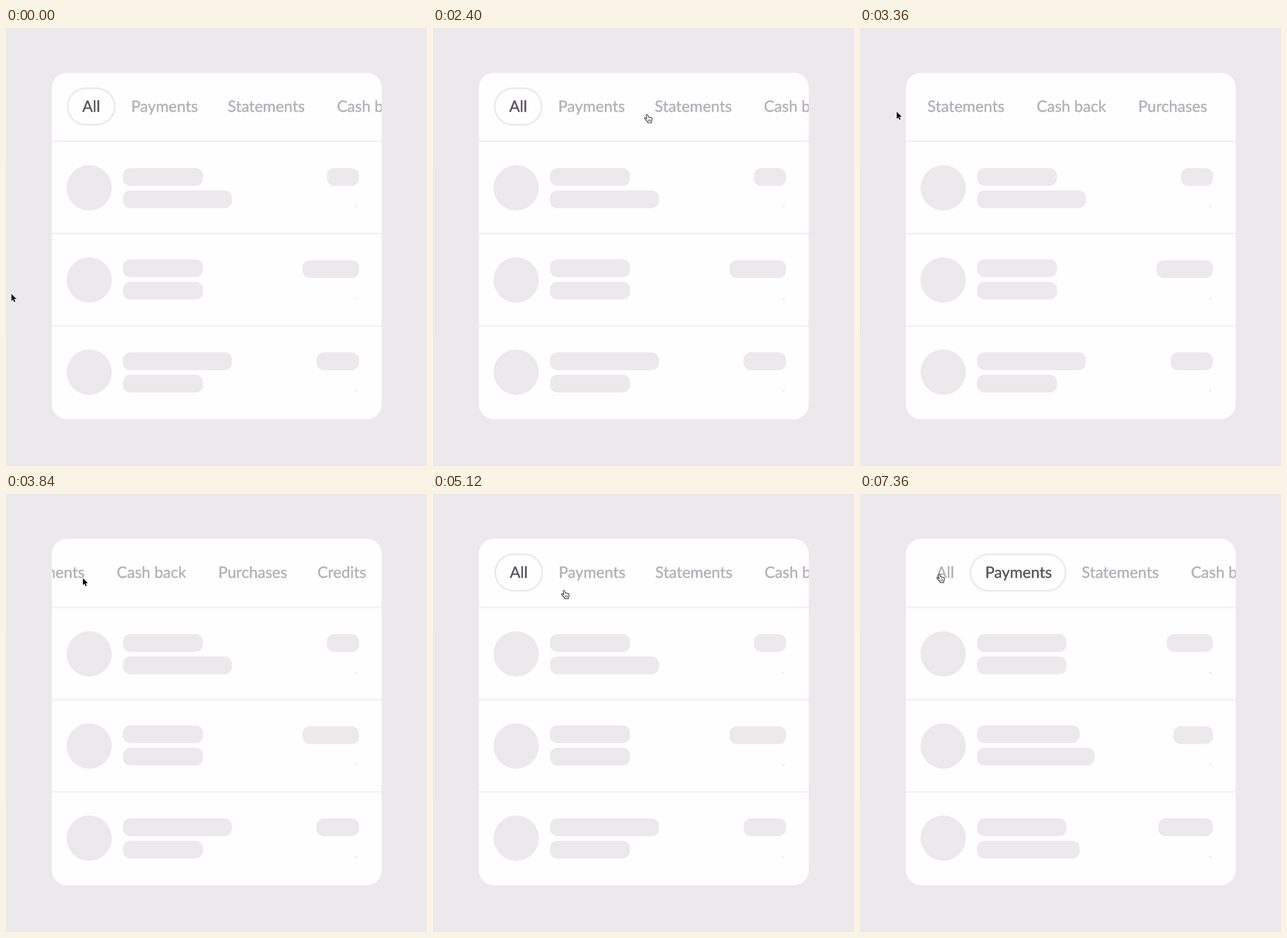
Animation of 734x763 px, one loop 8000 ms. Source, as an HTML page:

```html
<!DOCTYPE html>
<html lang="en">
<head>
<meta charset="utf-8">
<title>Filter tabs</title>
<style>
  html, body { margin: 0; width: 100%; height: 100%; overflow: hidden; background: #ebe9ec; }
  svg { display: block; width: 734px; height: 763px; }
  text { font: 400 27.2px Lato, sans-serif; text-anchor: middle; stroke-width: .5;
         text-rendering: geometricPrecision; }
  .pill { fill: none; stroke: #ebe9ec; stroke-width: 3; }
  .rule { stroke: #f3f1f4; stroke-width: 3; }
  .bone { fill: #ebe9ec; }
  .speck { stroke: #c4c2c7; stroke-width: 1; }
</style>
</head>
<body>
<svg viewBox="0 0 734 763">
  <clipPath id="clip"><rect x="80" y="78" width="575" height="603.5" rx="26"/></clipPath>
  <path d="M.5 240V536" stroke="#e6e4e8"/>
  <rect x="80" y="78" width="575" height="603.5" rx="26" fill="#fefdff"/>
  <g clip-path="url(#clip)">
    <g id="tabs"></g>
    <path class="rule" d="M80 197.5H655M80 358.2H655M80 519H655"/>
  </g>
  <g id="rows"></g>
  <path id="arrow" d="M0 0V12.2L2.8 9.6L4.7 14L6.7 13.1L4.8 8.8L8.7 8.6Z" fill="#0b0a0c"
        stroke="#fff" stroke-width="1" stroke-opacity=".7" paint-order="stroke"/>
  <g id="hand" stroke="#29282c" stroke-width="1.1" stroke-linejoin="round" stroke-linecap="round">
    <path fill="#fff" d="M5 9L4 2.5Q4 .8 5.3 .8Q6.4 .8 6.8 2.4L7.6 5.5Q9.5 4.8 10 6Q11.8 5.4 12.3 6.7Q14.2 6.4 14.3 8.5Q14.6 11 13 13.5V15.5H7Q6.5 13.5 4.8 12L1.4 8.6Q.6 7 2 6.6Q3.2 6.4 4.8 8.4Z"/>
    <path fill="none" stroke-width=".8" d="M7.8 10V13M9.7 10V13M11.6 10V13"/>
  </g>
</svg>
<script>
const LOOP = 8000, STEP = 160;
const LEFT = 204, RIGHT = 615.5, ROW_TOP = 278.5, ROW_GAP = 160.5;
const $ = id => document.getElementById(id);
const mix = (a, b, p) => a + (b - a) * p;

// Eased progress of t from start to end, held at 0 and 1 outside
function ease(t, start, end) {
  const p = Math.min(1, Math.max(0, (t - start) / (end - start)));
  return p * p * (3 - 2 * p);
}

function add(parent, tag, attrs, text) {
  const el = document.createElementNS('http://www.w3.org/2000/svg', tag);
  for (const k in attrs) el.setAttribute(k, attrs[k]);
  if (text) el.textContent = text;
  parent.appendChild(el);
  return el;
}

// Tabs: label and centre
const labels = Object.entries({ All: 148.5, Payments: 276.3, Statements: 453.8,
  'Cash back': 637.5, Purchases: 814, Credits: 969.5 })
  .map(([s, x]) => add($('tabs'), 'text', { x, y: 145.8, fill: '#b3b1b6', stroke: '#b3b1b6' }, s));
const pill = (x, width) => add($('tabs'), 'rect',
  { class: 'pill', x, y: 105, width, height: 63.5, rx: 31.75 });
const pills = [pill(107.5, 82), pill(192.5, 166)];

// Rows: widths before and after the filter changes
const rows = [
  { title: [139.5, 156], note: [190, 156], amount: [56, 80.5], ring: '#bfe6e2', lift: 0 },
  { title: [139.5, 179], note: [139.5, 205], amount: [98.5, 69], ring: '#dcdcd6', lift: 1.5 },
  { title: [190, 156], note: [139.5, 179], amount: [74, 95.5], ring: '#d6d5d8', lift: 0 }
].map(({ title, note, amount, ring, lift }, i) => {
  const g = $('rows'), cy = ROW_TOP + i * ROW_GAP;
  const bar = (y, widths) => ({ widths,
    el: add(g, 'rect', { class: 'bone', x: LEFT, y, height: 31, rx: 13 }) });
  add(g, 'path', { class: 'speck', d: `M609.5 ${cy + 33.5}l3 -2` });
  return {
    circle: add(g, 'circle', { class: 'bone', cx: 145, cy, r: 39.5, stroke: ring }),
    bars: [bar(cy - 34.5 - lift, title), bar(cy + 4.5 - lift, note)],
    end: bar(cy - 34.5, amount)
  };
});

// Cursor legs, each eased from where the last one ended
const home = { x: 9.5, y: 463.5 };
const legs = [
  { start: 320, end: 1300, x: -40, y: 147, bow: 30 },
  { start: 1305, end: 2240, x: 395, y: 150 },
  { start: 2240, end: 3250, x: 64, y: 146 },
  { start: 3640, end: 4320, x: 400, y: 149 },
  { start: 4400, end: 5120, x: 228, y: 167 },
  { start: 5120, end: 5440, x: 258.5, y: 136 },
  { start: 6900, end: 7360, x: 138, y: 139 }
];
const hovers = [[2080, 2560], [4960, 6080], [7040, LOOP]];

function cursor(t) {
  let { x, y } = home;
  for (const leg of legs) {
    const p = ease(t, leg.start, leg.end);
    x = mix(x, leg.x, p) + (leg.bow || 0) * Math.sin(Math.PI * p);
    y = mix(y, leg.y, p);
  }
  return { x, y };
}

// Swipe to the end, swipe back a touch too far, settle
const scroll = t => 384 * ease(t, 2535, 3830) - 385 * ease(t, 3830, 4800) + ease(t, 5120, 6400);

function tint(el, on) {
  const c = `rgb(${[179, 177, 182].map(v => Math.round(v - 91 * on))})`;
  el.setAttribute('fill', c);
  el.setAttribute('stroke', c);
}

function draw(time) {
  const t = Math.floor(time % LOOP / STEP) * STEP;
  const p = ease(t, 5970, 6300);
  $('tabs').setAttribute('transform', `translate(${-scroll(t)} 0)`);
  [1 - p, p].forEach((on, i) => {
    tint(labels[i], on);
    pills[i].style.opacity = on;
  });

  for (const { circle, bars, end } of rows) {
    circle.setAttribute('stroke-opacity', Math.sin(Math.PI * p));
    for (const { el, widths } of [...bars, end]) el.setAttribute('width', mix(...widths, p));
    end.el.setAttribute('x', RIGHT - mix(...end.widths, p));
  }

  const { x, y } = cursor(t);
  const hand = hovers.some(([a, b]) => t >= a && t < b);
  $('arrow').style.display = hand ? 'none' : '';
  $('hand').style.display = hand ? '' : 'none';
  $('arrow').setAttribute('transform', `translate(${x} ${y})`);
  $('hand').setAttribute('transform', `translate(${x - 5} ${y})`);
}

let start;
function tick(now) {
  start ??= now;
  draw(now - start);
  requestAnimationFrame(tick);
}
draw(0);
requestAnimationFrame(tick);
</script>
</body>
</html>
```
